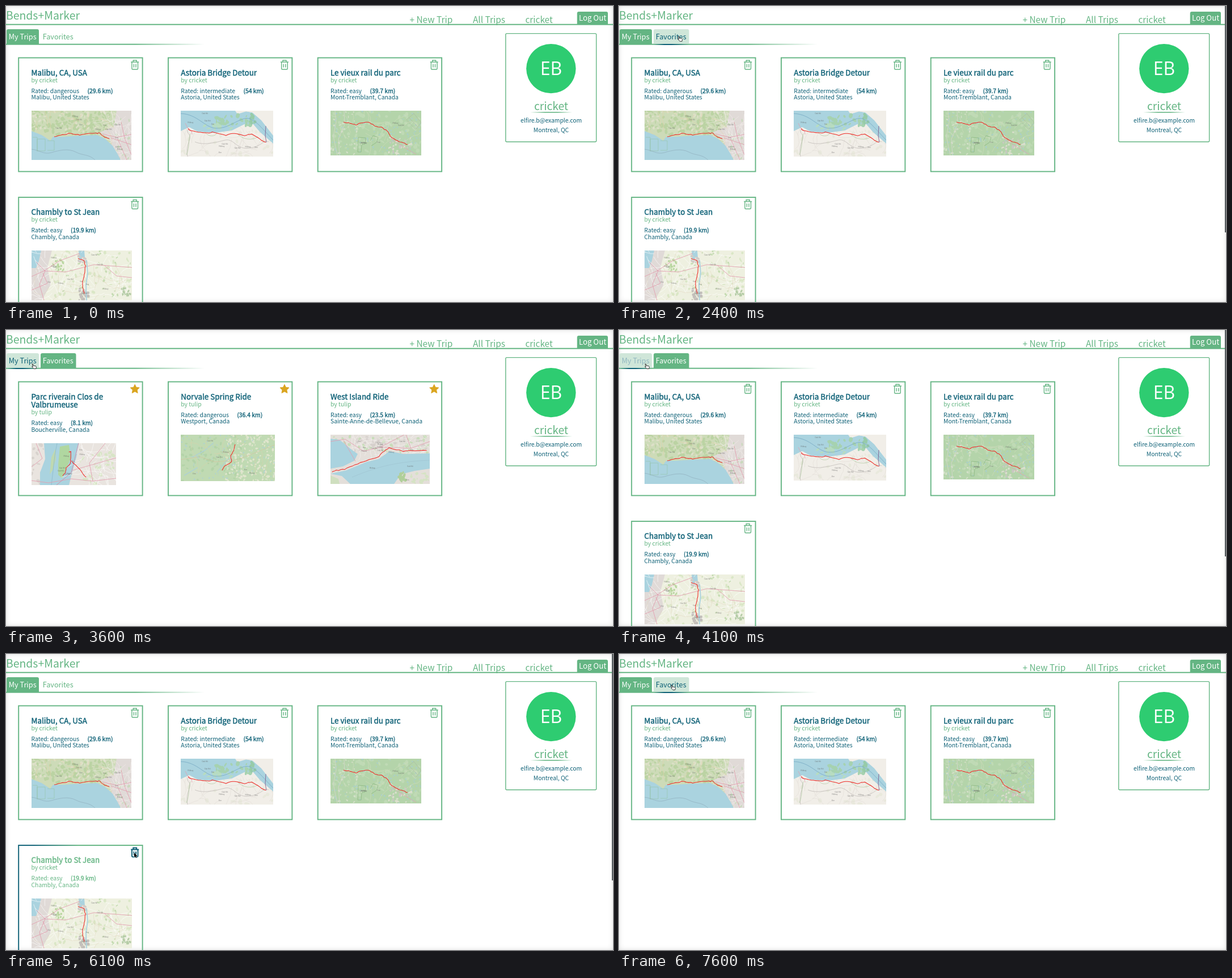
An HTML page with a canvas for the animation above (8000 ms loop, 1070 by 523 pixels).

```html
<!DOCTYPE html>
<html lang="en">
<head>
<meta charset="utf-8">
<title>Trips</title>
<style>
  html, body { margin: 0; width: 100%; height: 100%; overflow: hidden; background: #fff; }
  body { box-shadow: inset 0 0 10px rgba(0, 0, 0, .13); }
  canvas { display: block; }
</style>
</head>
<body>
<canvas id="stage" width="1070" height="523"></canvas>
<script>
const LOOP = 8000;
const GREEN = [100, 181, 131], TEAL = [13, 96, 118], WHITE = [255, 255, 255], LIGHT = [207, 230, 217];
const SANS = '"Noto Sans CJK JP", "Noto Sans CJK SC", "Noto Sans CJK", sans-serif';
const ctx = document.getElementById('stage').getContext('2d');

const rgb = (c, a = 1) => `rgba(${c.map(Math.round).join()},${a})`;
const mix = (a, b, k) => a.map((v, i) => v + (b[i] - v) * k);

// Piecewise linear value through keys of the form [time, ...values].
function track(keys, t) {
  const next = keys.findIndex(k => k[0] > t);
  if (next === 0) return keys[0].slice(1);
  if (next < 0) return keys[keys.length - 1].slice(1);
  const a = keys[next - 1], b = keys[next];
  return mix(a.slice(1), b.slice(1), (t - a[0]) / (b[0] - a[0]));
}

// `swell` thickens the glyphs a little, for weights between regular and bold.
function text(str, x, y, size, color, { weight = 400, align = 'left', family = SANS, swell = 0 } = {}) {
  ctx.font = `${weight} ${size}px ${family}`;
  ctx.textAlign = align;
  ctx.fillStyle = ctx.strokeStyle = rgb(color);
  ctx.fillText(str, x, y);
  if (swell) {
    ctx.lineWidth = swell;
    ctx.strokeText(str, x, y);
  }
  return ctx.measureText(str).width;
}

function bar(x, y, w, h, stops) {
  const g = ctx.createLinearGradient(x, 0, x + w, 0);
  stops.forEach(([at, color]) => g.addColorStop(at, color));
  ctx.fillStyle = g;
  ctx.fillRect(x, y, w, h);
}

// ---- maps: each is a list of layers painted once to its own canvas ----
let seed = 7;
const rand = (a = 0, b = 1) => {
  seed = (seed * 16807) % 2147483647;
  return a + (b - a) * seed / 2147483647;
};
const fill = (color, d) => g => { g.fillStyle = color; g.fill(new Path2D(d)); };
const line = (color, d, width = 1) => g => {
  g.strokeStyle = color; g.lineWidth = width; g.stroke(new Path2D(d));
};
const blobs = (color, n, [x, y, w, h], size) => g => {
  g.fillStyle = color;
  for (let i = 0; i < n; i++) {
    g.beginPath();
    g.ellipse(rand(x, x + w), rand(y, y + h), rand(.4, 1) * size, rand(.2, .7) * size, rand(0, 3), 0, 7);
    g.fill();
  }
};
const roads = (color, n, [x, y, w, h], width = .6) => g => {
  g.strokeStyle = color; g.lineWidth = width;
  for (let i = 0; i < n; i++) {
    let px = rand(x, x + w), py = rand(y, y + h), dir = rand(0, 6.3);
    g.beginPath(); g.moveTo(px, py);
    for (let j = 0; j < 5; j++) {
      dir += rand(-.6, .6);
      g.lineTo(px += 7 * Math.cos(dir), py += 7 * Math.sin(dir));
    }
    g.stroke();
  }
};
const labels = (n, [x, y, w, h]) => g => {
  g.fillStyle = 'rgba(90,90,90,.7)'; g.font = `3px ${SANS}`;
  for (let i = 0; i < n; i++) g.fillText(['Oak Hill', 'Millbay', 'Elm'][i % 3], rand(x, x + w), rand(y, y + h));
};
// Wobbly red line through "x,y" points.
const route = pts => g => {
  const p = pts.split(' ').map(s => s.split(',').map(Number));
  g.beginPath(); g.moveTo(...p[0]);
  for (let i = 1; i < p.length; i++) {
    for (let k = 1; k <= 4; k++) {
      const [x, y] = mix(p[i - 1], p[i], k / 4);
      g.lineTo(x + rand(-.5, .5), y + rand(-.8, .8));
    }
  }
  g.strokeStyle = '#ee2b27'; g.lineWidth = 1.05; g.lineJoin = 'round'; g.stroke();
};

function makeMap(w, h, land, ...layers) {
  const c = document.createElement('canvas');
  c.width = w; c.height = h;
  const g = c.getContext('2d');
  fill(land, `M0 0H${w}V${h}H0Z`)(g);
  layers.forEach(paint => paint(g));
  return c;
}

const WATER = '#aad3df', PINK = '#e3a0b0', URBAN = '#e0dad7', GREY = '#c3bfbb';
const maps = {
  coast: makeMap(176, 87, '#cddbb8',
    blobs('#bbd3a3', 150, [0, 0, 150, 42], 4.5), blobs('#dde0c8', 70, [0, 0, 150, 42], 3.5),
    fill(URBAN, 'M150 0H176V87H150L138 50L120 38L145 28Z'),
    blobs('#c9d9bd', 22, [148, 5, 28, 80], 3), roads('#f3efec', 40, [140, 10, 36, 75]),
    roads('#e6cfa5', 12, [10, 0, 130, 38], .5),
    line(PINK, 'M176 42L150 47L125 41M158 20L164 48L176 78M140 48L176 60M152 50L168 87', .9),
    fill(WATER, 'M0 36L18 43L33 53L38 46L55 46L85 44L116 43L130 50L143 62L152 77L157 87H0Z'),
    line('#8cbf98', 'M10 50H24V71H10ZM2 47H10V72M28 53H40V70H28', .5),
    line('#8ba8b8', 'M0 68C15 70 22 78 35 74S65 66 78 73S100 76 112 87', .6),
    labels(7, [20, 8, 130, 28]), labels(4, [145, 12, 15, 65]),
    route('40,46 54,42 70,40 85,43 100,40 112,40 120,40 129,47 137,49')),
  river: makeMap(163, 81, '#f1eee8',
    blobs('#e9e9dd', 25, [0, 35, 163, 46], 5), roads('#dfd9d3', 24, [0, 35, 163, 46], .5),
    fill(WATER, 'M0 0H106L126 3L142 17L163 44V58L140 38L128 24L112 24L90 35L60 39L30 37L15 29L0 36Z'),
    fill('#f1eee8', 'M96 0H163V38L146 19L134 5L116 1L100 6Z'),
    blobs('#a6d2b0', 30, [62, 8, 66, 18], 5), blobs('#b7dcc0', 16, [40, 24, 50, 9], 4.5),
    blobs('#97cba9', 9, [122, 4, 10, 18], 5),
    line('#6fa3bf', 'M0 5C30 6 42 30 62 31S96 18 112 14S140 28 163 52', .7),
    line('#b3aea9', 'M12 81C9 66 14 58 16 49S10 42 12 33M25 55C40 62 62 56 78 52S98 70 122 66S145 50 155 55', .6),
    line('#a3c293', 'M17 40C13 52 16 64 10 78M42 37C50 48 60 45 64 40M100 41C114 55 132 50 136 46', .6),
    line('#84608e', 'M150 27L149 44L151 56', .9), line(PINK, 'M8 22L14 34L19 36L20 42', .8),
    labels(6, [5, 40, 135, 36]), labels(4, [3, 5, 55, 20]),
    route('13,32 18,35 35,38 50,40 56,37 80,43 95,40 112,44 125,41 140,50 150,56')),
  forest: makeMap(160, 79, '#b4d4aa',
    blobs('#bfdab5', 90, [0, 0, 160, 79], 5), blobs('#d5e0ca', 40, [0, 0, 55, 79], 2.5),
    blobs('#a9cfcb', 110, [0, 0, 160, 79], 2), blobs('#dadfcd', 26, [100, 38, 45, 40], 3),
    line('#d3d6cb', 'M8 0L10 20L5 45L12 79M24 0L25 24L14 50L16 79', .9),
    line('#86b37b', 'M49 47L62 48L61 59L55 60L54 73H48ZM70 53L75 44L84 47L81 56L72 62', .7),
    line('#a7b69f', 'M134 16L147 5L160 21L150 33ZM138 12L154 29', .6),
    blobs('#c9c7c1', 14, [105, 48, 35, 25], 3), line(PINK, 'M107 49L130 65L151 77', .8),
    roads('#d6dcc0', 20, [0, 0, 160, 79], .5), labels(5, [20, 18, 110, 42]),
    route('23,20 35,22 45,25 54,21 70,21 78,28 90,29 100,36 106,45 118,54 128,56 136,60')),
  plains: makeMap(177, 88, '#eef0e0',
    blobs('#dae7c6', 70, [35, 0, 140, 88], 4), blobs('#c6dcb3', 26, [35, 0, 140, 88], 3),
    fill(URBAN, 'M0 0H36L28 30L34 60L18 88H0Z'), fill(WATER, 'M0 0H17L13 18L8 31H0ZM83 0H93L94 13L84 16Z'),
    blobs('#b7d59d', 12, [38, 16, 18, 20], 4), blobs('#b5cca6', 10, [160, 66, 14, 14], 4),
    blobs(GREY, 18, [83, 68, 17, 20], 4.5), blobs('#d0cbc7', 10, [82, 10, 14, 12], 4),
    roads('#fff', 60, [0, 0, 177, 88]), roads('#e0d5bd', 25, [0, 0, 177, 88], .5),
    line(PINK, 'M0 46L22 36L50 18L85 5M8 20L24 36L14 60L22 88M22 36L60 38L110 25L177 30M0 70L28 58L20 40M128 26L150 45L177 48', .9),
    line(WATER, 'M97 17L99 40L96 60L97 88', 1.8), labels(12, [20, 8, 130, 72]),
    route('82,14 92,18 95,27 93,43 90,55 90,65 93,76')),
  island: makeMap(149, 74, '#e9e4df',
    blobs('#d8e5c6', 26, [85, 15, 64, 59], 5), blobs('#d8d3ce', 18, [0, 0, 22, 74], 4),
    fill(WATER, 'M22 0H84L79 25L72 50L66 74H15L15 52L24 28Z'),
    fill('#b0d7a0', 'M50 6L66 3L69 26L63 42L54 62L47 56L47 38Z'),
    fill('#bfd9b1', 'M35 25L42 10L43 28L37 48L32 55Z'),
    line('#8bbacd', 'M45 0L41 22L35 74', .8), roads('#fff', 38, [78, 5, 71, 65]),
    line(PINK, 'M0 42L19 27L8 0M0 66L30 70L70 63L108 67L149 62M108 67L102 35L130 0M72 48L149 26', .9),
    line('#d58aa5', 'M83 0L76 28L70 52L44 74', .9), labels(8, [8, 12, 120, 54]),
    route('66,16 69,15 69,35 61,44 60,52 55,57'), route('70,31 85,46 96,61')),
  lakes: makeMap(166, 82, '#c0dab3',
    blobs('#b3d3a8', 90, [0, 0, 110, 82], 3.5), blobs('#dfe5cd', 190, [80, 0, 86, 82], 3),
    blobs('#bfd9af', 90, [85, 0, 81, 82], 2.4), blobs('#b0d2d1', 100, [0, 0, 166, 82], 1.9),
    line('#b0d2d1', 'M20 40L42 28L58 14M64 66L81 46L91 38M6 72L30 58', 1.6),
    roads('#dccfa8', 16, [0, 0, 166, 82], .5), line('#dcb896', 'M0 44L34 39L60 48L98 45L166 18', .5),
    labels(6, [10, 12, 135, 60]),
    route('96,17 93,29 88,37 90,47 81,54 76,56 73,63')),
  lakeside: makeMap(175, 87, '#e4dfda',
    blobs('#c8ddba', 50, [0, 0, 175, 34], 4.5), blobs('#d6d0cc', 25, [40, 5, 130, 25], 4.5),
    roads('#f5f2f0', 50, [40, 0, 135, 36]),
    fill(WATER, 'M0 7L16 9L38 27L48 34L42 46L22 56L0 60ZM0 69L28 63L64 48L85 43L104 29L128 34L175 33V60L148 64L124 70L112 87H35L20 73Z'),
    fill('#cfdfbf', 'M0 72L14 78L16 87H0Z'), blobs('#b0cf99', 14, [120, 67, 14, 14], 4.5),
    blobs('#d5e3c4', 18, [142, 66, 33, 21], 4),
    line(PINK, 'M0 12L26 8L58 29L90 22L142 24L175 12M88 22L130 0M142 24L133 0M23 10L44 47', .9),
    line('#9bbccb', 'M38 75C75 60 108 48 175 45', .5), labels(11, [18, 6, 135, 27]), labels(3, [65, 57, 80, 24]),
    route('3,66 10,63 25,61 43,53 63,46 83,40 92,31 103,23 128,29 143,28 170,28'))
};

const card = (title, by, level, km, place, map) => ({ title: title.split('|'), by, level, km, place, map: maps[map] });
const trips = [
  card('Malibu, CA, USA', 'cricket', 'dangerous', '29.6', 'Malibu,| United States', 'coast'),
  card('Astoria Bridge Detour', 'cricket', 'intermediate', '54', 'Astoria,| United States', 'river'),
  card('Le vieux rail du parc', 'cricket', 'easy', '39.7', 'Mont-Tremblant,| Canada', 'forest'),
  card('Chambly to St Jean', 'cricket', 'easy', '19.9', 'Chambly,| Canada', 'plains')
];
const favorites = [
  card('Parc riverain Clos de|Valbrumeuse', 'tulip', 'easy', '8.1', 'Boucherville,| Canada', 'island'),
  card('Norvale Spring Ride', 'tulip', 'dangerous', '36.4', 'Westport,| Canada', 'lakes'),
  card('West Island Ride', 'tulip', 'easy', '23.5', 'Sainte-Anne-de-Bellevue,| Canada', 'lakeside')
];

// ---- timeline ----
const OPEN_FAVORITES = 2500, OPEN_TRIPS = 4000, DELETED = 6200;
const later = [[4850, 0], [5000, 1], [5200, 1], [5450, 0], [6850, 0], [7000, 1], [7180, 1], [7420, 0]];
const keys = {
  firstBorder: [[700, 0], [900, 1], [1000, 1], [1300, 0], ...later],
  firstText: [[700, 0], [900, 1], [1400, 1], [1750, 0], ...later],
  lastCard: [[5290, 0], [5550, 1]],
  trash: [[5400, 0], [5600, 1]],
  tripsOn: [[2500, 1], [2800, 0], [3900, 0], [4050, 1]],
  tripsHover: [[3300, 0], [3600, 1], [4800, 1], [5100, 0]],
  tripsTextHover: [[3300, 0], [3600, 1], [3900, 1], [4100, .45], [4500, 1], [4800, 1], [5100, 0]],
  favOn: [[2500, 0], [2800, 1], [4100, 1], [4500, 0]],
  favHover: [[1300, 0], [1600, 1], [3100, 1], [3400, 0], [7200, 0], [7480, 1]],
  scrollbar: [[500, 0], [1300, 1]],
  cursor: [[500, 900, 318], [700, 300, 316], [800, 200, 250], [1000, 114, 88], [1400, 105, 53],
    [2200, 105, 53], [2900, 99, 56], [3100, 99, 56], [3400, 50, 58], [3600, 45, 60], [4800, 45, 60],
    [5300, 226, 345], [5600, 226, 351], [6700, 226, 351], [7250, 100, 62], [7600, 91, 55]]
};

// ---- drawing ----
function header() {
  text('Bends+Marker', 0, 24, 19.4, GREEN);
  text('+ New Trip', 711.5, 29.6, 15.4, GREEN);
  text('All Trips', 823, 29.6, 15.4, GREEN);
  text('cricket', 915.5, 29.6, 15.4, GREEN);
  ctx.fillStyle = rgb(GREEN);
  ctx.fillRect(0, 31.7, 1070, 2);
  ctx.beginPath(); ctx.roundRect(1006.7, 10, 54.3, 23, [3, 3, 0, 0]); ctx.fill();
  text('Log Out', 1010, 26, 13.2, WHITE);
}

function profile() {
  ctx.strokeStyle = rgb(GREEN); ctx.lineWidth = 1.4;
  ctx.beginPath(); ctx.roundRect(880.8, 48.6, 159.8, 191.4, 2); ctx.stroke();
  ctx.fillStyle = '#2ecc71';
  ctx.beginPath(); ctx.arc(960.8, 110.6, 43.7, 0, 7); ctx.fill();
  text('EB', 961, 122, 32, WHITE, { align: 'center', family: '"Open Sans", "Noto Sans", sans-serif' });
  text('cricket', 961, 184, 19.2, GREEN, { align: 'center' });
  const clear = rgb(GREEN, 0);
  bar(924, 187, 74, 1.6, [[0, clear], [.35, rgb(GREEN)], [.65, rgb(GREEN)], [1, clear]]);
  text('elfire.b@example.com', 961, 206, 10.3, TEAL, { align: 'center' });
  text('Montreal, QC', 961, 223, 10.3, TEAL, { align: 'center' });
}

function tab(label, x, w, on, hover, textHover = hover) {
  ctx.fillStyle = rgb(mix(GREEN, LIGHT, hover), Math.max(on, hover));
  ctx.beginPath(); ctx.roundRect(x, 41, w, 26, [3, 3, 0, 0]); ctx.fill();
  text(label, x + 3.7, 59, 12.7, mix(mix(GREEN, WHITE, on), TEAL, textHover));
  bar(x, 67, w, 2, [[0, rgb(TEAL, 0)], [.3, rgb(TEAL, hover)], [.5, rgb(TEAL, hover)], [1, rgb(TEAL, 0)]]);
}

function trashCan(x, y, hover) {
  ctx.strokeStyle = rgb(mix(GREEN, TEAL, hover));
  ctx.lineWidth = 1.4 + .5 * hover;
  ctx.stroke(new Path2D(`M${x - 7} ${y - 5}h14M${x - 3} ${y - 5}v-3h6v3M${x - 5.3} ${y - 5}v11.5q0 1.5 1.5 1.5h7.6q1.5 0 1.5-1.5v-11.5M${x - 1.8} ${y - 1.5}v6M${x + 1.8} ${y - 1.5}v6`));
}

function star(x, y) {
  ctx.fillStyle = ctx.strokeStyle = '#daa520';
  ctx.lineWidth = 1;
  ctx.lineJoin = 'round';
  ctx.beginPath();
  for (let i = 0; i < 10; i++) {
    const r = i % 2 ? 4.1 : 8.4, a = i * Math.PI / 5;
    ctx.lineTo(x + r * Math.sin(a), y + .6 - r * Math.cos(a));
  }
  ctx.closePath();
  ctx.fill();
  ctx.stroke();
  ctx.lineJoin = 'miter';
}

function drawCard(c, i, favorite, { border = 0, words = 0, country = words, trash = 0 }) {
  const x = 22.2 + (i % 3) * 263.75, y = 91.5 + (i > 2 ? 246.5 : 0);
  const frame = ctx.createLinearGradient(x, 0, x + 218, 0);
  frame.addColorStop(0, rgb(mix(GREEN, TEAL, border)));
  frame.addColorStop(.12, rgb(mix(GREEN, TEAL, border)));
  frame.addColorStop(.48, rgb(GREEN));
  ctx.strokeStyle = frame; ctx.lineWidth = 1.9;
  ctx.strokeRect(x, y, 218.4, 201);
  if (favorite) star(x + 205, y + 12.5); else trashCan(x + 205, y + 12.5, trash);

  const left = x + 22.3, ink = mix(TEAL, GREEN, words), drop = (c.title.length - 1) * 14.5;
  c.title.forEach((s, n) => text(s, left, y + 31.3 + n * 14.5, 13.45, ink, { swell: .4 }));
  text('by ' + c.by, left, y + 43.2 + drop, 10.35, GREEN);
  const w = text('Rated: ' + c.level, left, y + 62 + drop, 10.35, ink);
  text(`(${c.km} km)`, left + w + 14.5, y + 62 + drop, 10.4, ink, { swell: .35 });
  const [town, land] = c.place.split('|');
  const townWidth = text(town, left, y + 73.7 + drop, 10.35, ink);
  text(land, left + townWidth, y + 73.7 + drop, 10.35, mix(TEAL, GREEN, country));
  ctx.drawImage(c.map, Math.round(left), Math.round(y + 93.5 + drop));
}

function cursor(x, y, hand) {
  ctx.save();
  ctx.translate(x, y);
  ctx.lineJoin = 'round';
  ctx.lineWidth = .9;
  if (hand) {
    const shape = new Path2D('M1 0q1-.8 1.7.4l.8 2.6 3.6.5q1.4.5 1.2 2.3l-.5 2.7h-3.8l-3.2-3.5q-.3-1 1-.8l.8.5z');
    ctx.fillStyle = '#fff'; ctx.fill(shape);
    ctx.strokeStyle = '#222'; ctx.stroke(shape);
  } else {
    const shape = new Path2D('M0 0V8L1.9 6.4L3.1 9.2L4.5 8.6L3.3 5.9H5.7Z');
    ctx.strokeStyle = '#fff'; ctx.stroke(shape);
    ctx.fillStyle = '#000'; ctx.fill(shape);
  }
  ctx.restore();
}

function draw(t) {
  const at = name => track(keys[name], t)[0];
  const onFavorites = t >= OPEN_FAVORITES && t < OPEN_TRIPS;
  ctx.clearRect(0, 0, 1070, 523);
  header();
  profile();
  bar(0, 66.7, 350, 2, [[0, rgb(GREEN)], [.65, rgb(GREEN)], [1, rgb(GREEN, 0)]]);
  tab('My Trips', 1, 57, at('tripsOn'), at('tripsHover'), at('tripsTextHover'));
  tab('Favorites', 61, 62.5, at('favOn'), at('favHover'));

  const first = { border: at('firstBorder'), words: at('firstText') };
  if (t < 1800) first.country = 0;
  const last = { border: at('lastCard'), words: at('lastCard'), trash: at('trash') };
  const shown = onFavorites ? favorites : t < DELETED ? trips : trips.slice(0, 3);
  shown.forEach((c, i) => drawCard(c, i, onFavorites, onFavorites ? {} : { 0: first, 3: last }[i] || {}));

  if (shown.length > 3) {
    ctx.fillStyle = `rgba(85,90,94,${at('scrollbar')})`;
    ctx.fillRect(1068, 0, 2, 400);
  }
  if (t >= 500) {
    const [x, y] = track(keys.cursor, t);
    cursor(x, y, y < 67);
  }
}

function tick() {
  draw(performance.now() % LOOP);
  requestAnimationFrame(tick);
}
tick();
</script>
</body>
</html>
```
